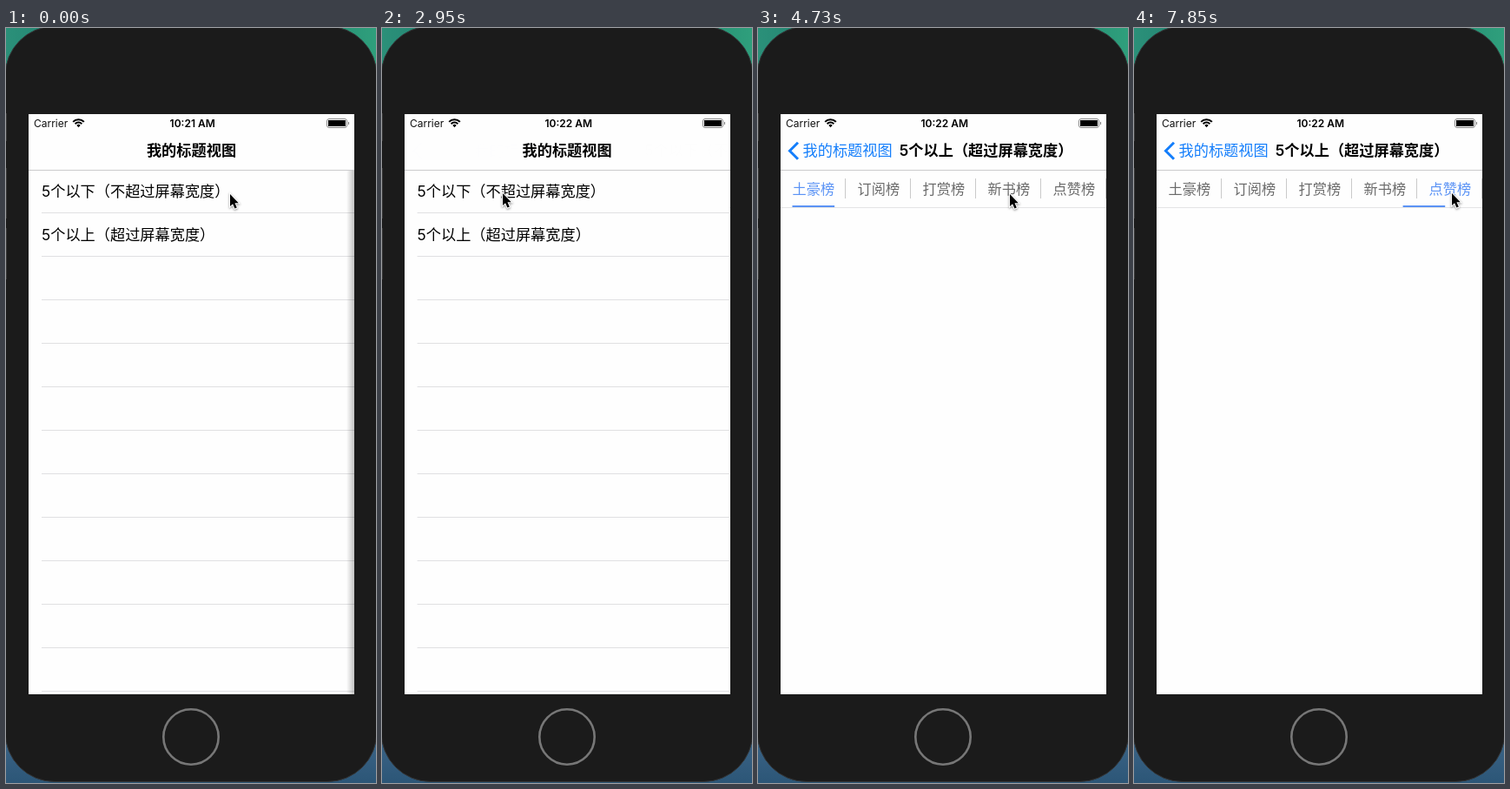
Animation of 426x868 px, one loop 7.99 s. Source, as an HTML page with a canvas:

```html
<!DOCTYPE html>
<html lang="zh-CN">
<head>
<meta charset="utf-8">
<style>
  html, body { margin: 0; width: 100%; height: 100%; overflow: hidden; background: #1b1b1b; }
  canvas { display: block; }
</style>
</head>
<body>
<canvas id="stage" width="426" height="868"></canvas>
<script>
const ctx = document.getElementById('stage').getContext('2d');
const LOOP = 7990, STEP = LOOP / 54;
const LEFT = 26, TOP = 99, WIDTH = 375, BOTTOM = 766, NAV_BOTTOM = 164;
const FONT = 'Inter, "Noto Sans CJK SC", "Noto Sans CJK", sans-serif';
const PAPER = '#fefefe', TINT = '#147efb', ACCENT = '#5b93f5';

const HOME_TITLE = '我的标题视图';
const PAGES = [
  { title: '5个以下（不超过屏幕宽度）', tabs: ['器械', '课程'], pitch: 187.5, picks: [[0, 0], [880, 1], [1810, 0]] },
  { title: '5个以上（超过屏幕宽度）', tabs: ['土豪榜', '订阅榜', '打赏榜', '新书榜', '点赞榜', '畅销榜'],
    pitch: 75, picks: [[0, 0], [6947, 2], [7628, 4]] }
];
const PUSH_1 = 0, POP = 2515, PUSH_2 = 3681;

// Keys: time, value(s)
const CURSOR = [
  [0, 258, 191], [310, 258, 191], [800, 305, 190], [1330, 305, 190], [1750, 127, 191], [2000, 127, 191],
  [2340, 107, 135], [2520, 107, 135], [2930, 139, 190], [3080, 139, 190], [3600, 176, 243], [4150, 176, 243],
  [4700, 290, 191], [4800, 290, 191], [5180, 150, 186], [5470, 148, 183], [5560, 148, 184],
  [5920, 280, 190], [6300, 280, 190], [6800, 205, 190], [7150, 205, 190], [7560, 366, 190], [LOOP, 366, 190]
];
const SCROLL = [[4800, 0], [5180, 90], [5440, 76], [5560, 76], [5920, -28], [6370, 0]];

const clamp = v => Math.max(0, Math.min(1, v));
const smooth = v => { v = clamp(v); return v * v * (3 - 2 * v); };
const mix = (a, b, k) => a + (b - a) * k;

function track(keys, t, column = 1) {
  let i = 0;
  while (i < keys.length - 2 && t >= keys[i + 1][0]) i++;
  const a = keys[i], b = keys[i + 1];
  return mix(a[column], b[column], smooth((t - a[0]) / (b[0] - a[0])));
}

// Critically damped spring, falling from 1 to 0
function spring(ms) {
  const x = Math.max(0, ms) * 0.0176;
  return (1 + x) * Math.exp(-x);
}

function box(x, y, w, h, color) {
  ctx.fillStyle = color;
  ctx.fillRect(x, y, w, h);
}

function text(str, x, y, size, color, weight = 400, align = 'left') {
  ctx.font = `${weight} ${size}px ${FONT}`;
  ctx.textAlign = align;
  ctx.fillStyle = color;
  ctx.fillText(str, x, y);
}

function clipped(x, y, w, h, draw) {
  ctx.save();
  ctx.beginPath();
  ctx.rect(x, y, w, h);
  ctx.clip();
  draw();
  ctx.restore();
}

function stroke(color, width) {
  ctx.strokeStyle = color;
  ctx.lineWidth = width;
  ctx.stroke();
}

function gradient(x0, y0, x1, y1, ...colors) {
  const g = ctx.createLinearGradient(x0, y0, x1, y1);
  colors.forEach((c, i) => g.addColorStop(i / (colors.length - 1), c));
  return g;
}

function drawPhone() {
  box(0, 0, 426, 434, gradient(0, 0, 426, 0, '#2b9079', '#0f6a63', '#2f9f7c'));
  box(0, 434, 426, 434, gradient(0, 800, 0, 868, '#41698c', '#2c5677'));
  ctx.beginPath();
  ctx.roundRect(-1, -2, 428, 868.5, 57);
  ctx.fillStyle = '#1b1b1b';
  ctx.fill();
  stroke('#343638', 1);
  for (const [y, h] of [[98, 32], [161, 58], [230, 59]]) box(0, y, 1, h, '#3a3a3a');
  ctx.beginPath();
  ctx.arc(213, 815, 31.7, 0, 7);
  stroke('#777', 2.6);
}

function drawStatus(t) {
  text('Carrier', 32, 113.7, 12, '#111');
  text(t < 880 ? '10:21 AM' : '10:22 AM', 214.7, 113.7, 12, '#000', 600, 'center');

  const mid = -Math.PI / 2, spread = 0.8;
  for (const r of [8.8, 5.4]) {
    ctx.beginPath();
    ctx.arc(83.5, 114, r, mid - spread, mid + spread);
    stroke('#000', 2);
  }
  ctx.beginPath();
  ctx.moveTo(83.5, 114.3);
  ctx.arc(83.5, 114, 3, mid - spread, mid + spread);
  ctx.fillStyle = '#000';
  ctx.fill();

  ctx.beginPath();
  ctx.roundRect(369.5, 104.5, 23, 10, 2.5);
  stroke('#8a8a8a', 1);
  box(371, 106, 20, 7, '#000');
  box(394, 108, 1, 3, '#777');
}

function drawNav(page, p) {
  box(LEFT, 163, WIDTH, 1, '#cbcbcd');
  ctx.globalAlpha = p * p;
  text(HOME_TITLE, 213.5 - 110 * (1 - p), 147.3, 17.2, '#000', 600, 'center');
  ctx.globalAlpha = 1 - p;
  ctx.beginPath();
  ctx.moveTo(46, 131.8);
  ctx.lineTo(36.5, 141.3);
  ctx.lineTo(46, 150.8);
  stroke(TINT, 3);
  text(HOME_TITLE, 51.5 + 55 * p, 147.3, 17.2, TINT);
  text(page.title, 162.8 + 140 * p, 147.3, 17.2, '#000', 600);
  ctx.globalAlpha = 1;
}

function drawList(p) {
  ctx.save();
  ctx.translate(LEFT - 0.3 * WIDTH * (1 - p), 0);
  PAGES.forEach((page, i) => text(page.title, 15, 194 + 50 * i, 17.2, '#000'));
  for (let y = 212; y < BOTTOM; y += 50) box(15, y, WIDTH, 1, '#e0e0e2');
  ctx.restore();
  box(LEFT, NAV_BOTTOM, WIDTH, BOTTOM - NAV_BOTTOM, `rgba(0,0,0,${0.1 * (1 - p)})`);
}

function drawTabs(page, t, scroll) {
  const { tabs, pitch, picks } = page;
  const now = picks.filter(pick => t >= pick[0]);
  const [since, selected] = now[now.length - 1];
  const before = now.length > 1 ? now[now.length - 2][1] : selected;
  const center = i => pitch * (i + 0.5) - scroll + 0.3;

  tabs.forEach((name, i) => {
    text(name, center(i), 190.8, 16.2, i === selected ? ACCENT : '#6a6a6a', 400, 'center');
    if (i < tabs.length - 1) box(Math.floor(pitch * (i + 1) - 0.5) - Math.round(scroll), 173, 1, 23, '#cacaca');
  });
  const w = tabs[0].length * 16.2;
  const x = mix(center(before), center(selected), smooth((t - since) / 300));
  box(x - w / 2, 204, w, 2, ACCENT);
}

function drawDetail(page, t, p, popping) {
  const height = BOTTOM - NAV_BOTTOM;
  ctx.save();
  ctx.translate(LEFT + WIDTH * p, 0);
  const strength = 0.24 * (popping ? 1 - p : p);
  box(-9, NAV_BOTTOM, 9, height, gradient(-9, 0, 0, 0, 'rgba(0,0,0,0)', `rgba(0,0,0,${strength})`));
  box(0, NAV_BOTTOM, WIDTH, height, PAPER);
  box(0, 206, WIDTH, 1, '#e4e4e5');
  drawTabs(page, t, page === PAGES[1] ? track(SCROLL, t) : 0);
  ctx.restore();
}

function drawCursor(x, y) {
  ctx.save();
  ctx.translate(x, y);
  ctx.beginPath();
  [[0, 0], [0, 14], [3.1, 11.2], [5.4, 16.6], [7.8, 15.6], [5.5, 10.3], [9.8, 10.2]]
    .forEach(point => ctx.lineTo(...point));
  ctx.closePath();
  ctx.shadowColor = 'rgba(0,0,0,.45)';
  ctx.shadowBlur = 2.5;
  ctx.shadowOffsetY = 1;
  stroke('#fff', 2);
  ctx.shadowColor = 'transparent';
  ctx.fillStyle = '#000';
  ctx.fill();
  ctx.restore();
}

function draw(t) {
  const page = PAGES[t < PUSH_2 ? 0 : 1];
  const popping = t >= POP && t < PUSH_2;
  // 1 shows the list, 0 shows the detail page
  let p = popping ? 1 - spring(t - POP) : spring(t - (t < POP ? PUSH_1 : PUSH_2));
  if (p < 0.0006) p = 0;

  drawPhone();
  box(LEFT, TOP, WIDTH, BOTTOM - TOP, PAPER);
  clipped(LEFT, TOP, WIDTH, BOTTOM - TOP, () => {
    drawStatus(t);
    drawNav(page, p);
    clipped(LEFT, NAV_BOTTOM, WIDTH, BOTTOM - NAV_BOTTOM, () => {
      drawList(p);
      drawDetail(page, t, p, popping);
    });
  });
  drawCursor(track(CURSOR, t, 1), track(CURSOR, t, 2));
}

const start = performance.now();
function tick() {
  const t = (performance.now() - start) % LOOP;
  draw(Math.min(53, Math.floor((t + 10) / STEP)) * STEP);
  requestAnimationFrame(tick);
}
tick();
</script>
</body>
</html>
```
